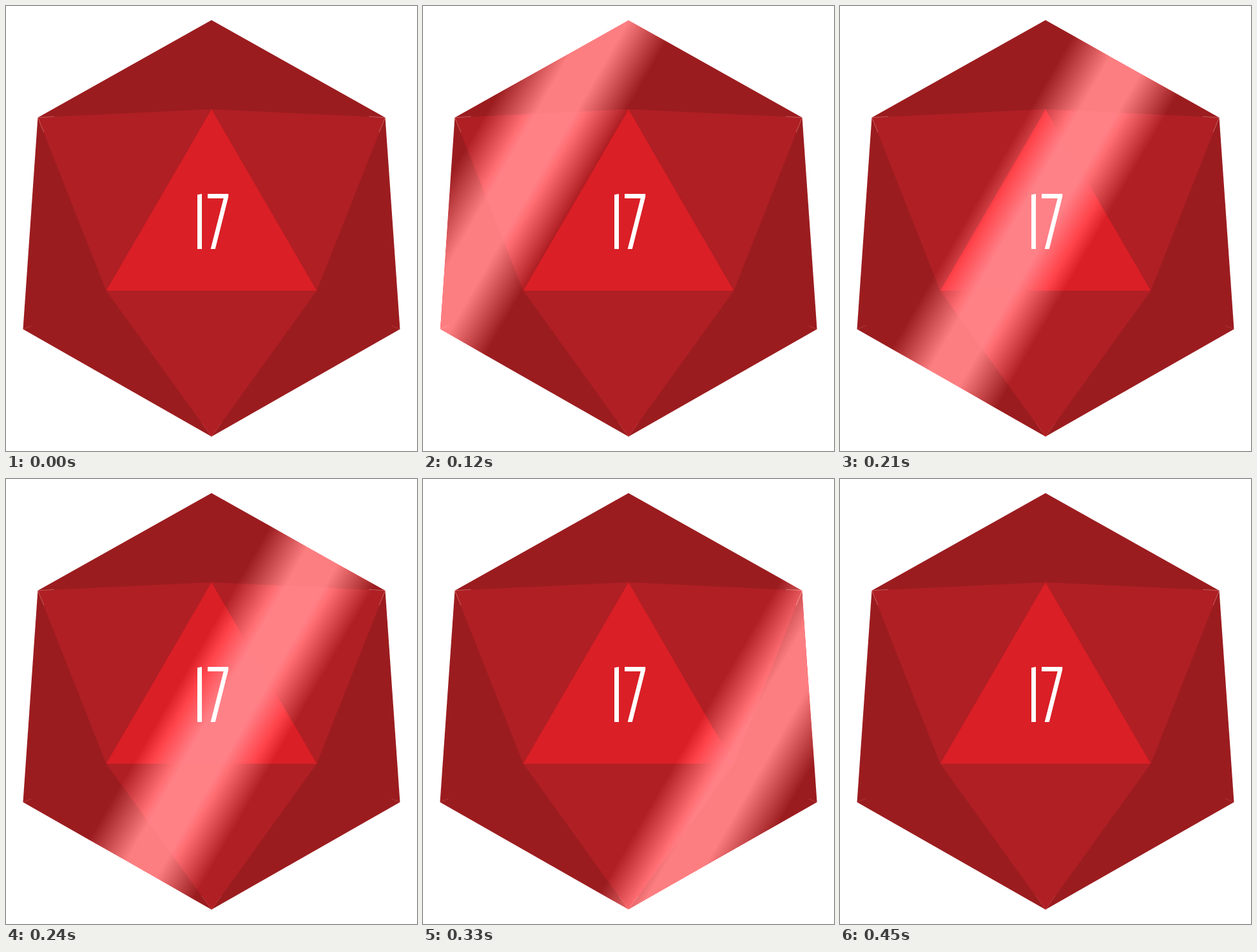
Recreate the animation shown at these times as an HTML page with a canvas. Size 640x694 px, loop 4.5 s.

```html
<!DOCTYPE html>
<html lang="en">
<head>
<meta charset="utf-8">
<title>Twenty-sided die</title>
<style>
  html, body { margin: 0; width: 100%; height: 100%; overflow: hidden; background: #fff; }
  canvas { display: block; }
</style>
</head>
<body>
<canvas id="stage" width="640" height="694" role="img" aria-label="Die showing 17"></canvas>
<script type="module">
const ctx = document.getElementById('stage').getContext('2d');
const LOOP = 4500, STEP = 30;

const peak = [320, 22], upRight = [590.5, 174], lowRight = [613.5, 504];
const foot = [320, 671.5], lowLeft = [26.5, 504], upLeft = [49.5, 174];
const apex = [320, 161], baseRight = [484, 444], baseLeft = [156, 444];

function trace(points) {
  ctx.beginPath();
  for (const p of points) ctx.lineTo(...p);
}

function fill(color, ...points) {
  trace(points);
  ctx.fillStyle = color;
  ctx.fill();
}

function glint(color, ...points) {
  trace(points);
  ctx.strokeStyle = color;
  ctx.lineWidth = 0.6;
  ctx.stroke();
}

function drawDie() {
  fill('#9b1c1f', peak, upRight, lowRight, foot, lowLeft, upLeft);
  fill('#af1f24', upLeft, apex, baseLeft);
  fill('#af1f24', upRight, apex, baseRight);
  fill('#af1f24', baseLeft, baseRight, foot);
  fill('#da1f26', apex, baseRight, baseLeft);

  // Fine gaps where the facets meet at the corners
  const pale = 'rgba(255,205,195,.6)', dim = 'rgba(225,100,95,.6)';
  glint(pale, [75, 172.3], upLeft, [59, 197]);
  glint(pale, [565, 172.3], upRight, [581, 197]);
  glint(dim, lowLeft, [40, 498.5]);
  glint(dim, lowRight, [600, 498.5]);
  glint(dim, [305, 650], foot, [335, 650]);
}

function drawNumber() {
  fill('#fff', [298, 294.3], [305, 293], [305, 379], [298, 379]);
  fill('#fff', [314, 293], [346.3, 293], [346.3, 297.5], [325.8, 379],
    [318.7, 379], [338.8, 300], [314, 300]);
}

// A slanted band of light, added to the colours below it
function drawShine(time) {
  const reach = 94, center = 38 + 1.87 * time;
  const at = d => [d * Math.cos(Math.PI / 6), d * Math.sin(Math.PI / 6)];
  const band = ctx.createLinearGradient(...at(center - reach), ...at(center + reach));
  band.addColorStop(0, '#000');
  band.addColorStop(0.36, '#626262');
  band.addColorStop(0.64, '#626262');
  band.addColorStop(1, '#000');
  ctx.globalCompositeOperation = 'lighter';
  ctx.fillStyle = band;
  ctx.fillRect(0, 0, 640, 694);
  ctx.globalCompositeOperation = 'source-over';
}

function render() {
  const time = Math.floor(performance.now() % LOOP / STEP) * STEP;
  ctx.fillStyle = '#fff';
  ctx.fillRect(0, 0, 640, 694);
  drawDie();
  if (time > 0 && time < 450) drawShine(time);
  drawNumber();
  requestAnimationFrame(render);
}
render();
</script>
</body>
</html>
```
